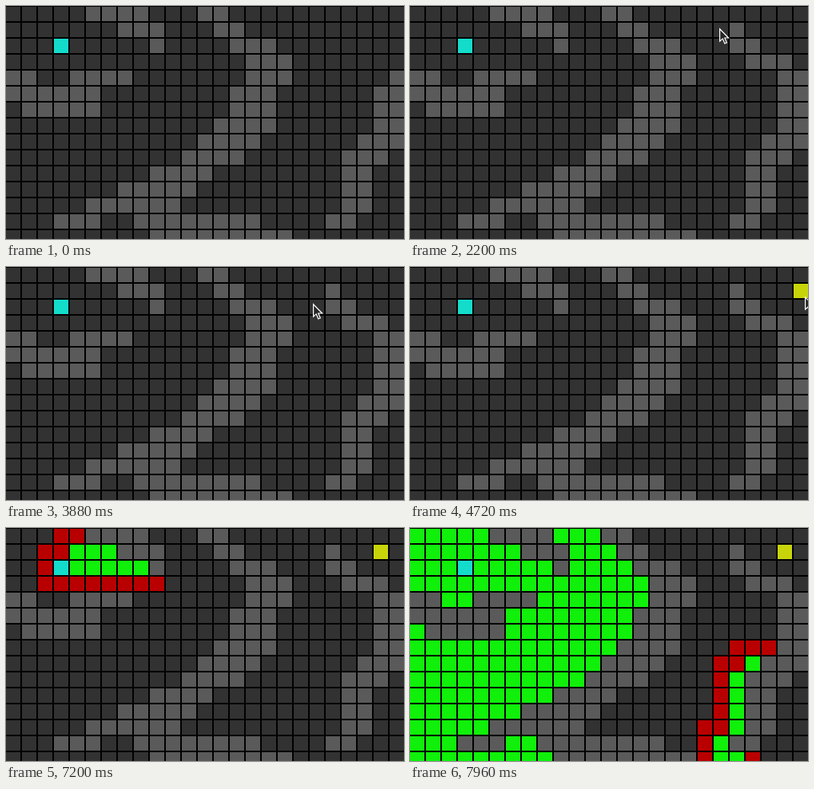
An HTML page with a canvas that plays this animation: 498x292 px, repeating every 8 s.

```html
<!DOCTYPE html>
<html lang="en">
<head>
<meta charset="utf-8">
<title>Pathfinding grid</title>
<style>
  html, body { margin: 0; height: 100%; overflow: hidden; background: #000; }
  canvas { display: block; }
</style>
</head>
<body>
<canvas id="stage" width="498" height="292"></canvas>
<script>
const ctx = document.getElementById('stage').getContext('2d');
const COLS = 25, ROWS = 17, LOOP = 8000, TICK = 40;
const START = [3, 2], END = [23, 1];
const COLOR = {
  free: '#323232', wall: '#5a5a5a', start: '#14dccb',
  end: '#c8d40a', open: '#b90000', closed: '#10f00a'
};
const id = (x, y) => y * COLS + x;

// Column ranges of the walls, row by row; the last two rows lie below the view.
const wallRows = [
  '5-8 12-13', '7-9 13-14', '9-9 14-16', '15-17', '0-1 4-7 15-17 24-24',
  '0-5 14-16 23-24', '1-5 14-16 23-24', '13-16 23-24', '12-15 22-24',
  '11-14 21-23', '9-12 21-22', '7-11 21-22', '5-10 21-22',
  '3-5 8-15 20-21', '9-17', '9-18', ''
];
// Walls painted with the pointer: column, row, time.
const painted = [
  [23, 4, 1000], [23, 3, 1400], [22, 3, 1560], [21, 3, 1720],
  [21, 2, 1800], [20, 2, 1880], [20, 1, 1960]
];
const wallTime = new Map();
wallRows.forEach((row, y) => {
  for (const range of row.split(' ').filter(Boolean)) {
    const [a, b] = range.split('-').map(Number);
    for (let x = a; x <= b; x++) wallTime.set(id(x, y), 0);
  }
});
painted.forEach(([x, y, t]) => wallTime.set(id(x, y), t));

// A* with eight neighbours of equal cost; records the step at which cells open and close.
function search(stopAt) {
  const opened = new Map([[id(...START), 1]]), closed = new Map();
  const cost = new Map([[id(...START), 0]]);
  const queue = new Set(cost.keys());
  const score = c =>
    cost.get(c) + Math.hypot(c % COLS - END[0], Math.floor(c / COLS) - END[1]);
  while (queue.size && !closed.has(stopAt)) {
    const cell = [...queue].reduce((a, b) => score(b) < score(a) ? b : a);
    const step = closed.size + 1;
    queue.delete(cell);
    closed.set(cell, step);
    const cx = cell % COLS, cy = Math.floor(cell / COLS);
    for (let y = Math.max(0, cy - 1); y <= Math.min(ROWS - 1, cy + 1); y++) {
      for (let x = Math.max(0, cx - 1); x <= Math.min(COLS - 1, cx + 1); x++) {
        const next = id(x, y), g = cost.get(cell) + 1;
        if (wallTime.has(next) || closed.has(next) || g >= (cost.get(next) ?? Infinity)) continue;
        cost.set(next, g);
        queue.add(next);
        if (!opened.has(next)) opened.set(next, step);
      }
    }
  }
  return { opened, closed };
}
const { opened, closed } = search(id(21, 8));
const midStep = closed.get(id(6, 6)) - 1, lastStep = closed.size;

function searchStep(t) {
  const k = (t - 7160) / TICK;
  if (k <= 0) return 0;
  return Math.round(k < 8 ? midStep * k / 8 : midStep + (lastStep - midStep) * (k - 8) / 12);
}

// Pointer track: time, x, y.
const track = [
  [560, 500, 105], [800, 486, 102], [1040, 477, 98], [1320, 477, 98],
  [1500, 466, 72], [1720, 436, 66], [1820, 424, 50], [1900, 410, 42],
  [1980, 402, 33], [2120, 387, 28], [2840, 387, 28], [3320, 361, 27],
  [3560, 361, 27], [3880, 384, 46], [4200, 440, 54], [4400, 458, 46],
  [4560, 478, 44], [4720, 494, 37], [4900, 495, 34], [5240, 472, 31],
  [5600, 480, 72], [5880, 487, 123], [6040, 500, 131]
];
function pointerAt(t) {
  const i = track.findIndex(p => p[0] > t);
  if (i < 1) return null;
  const [t0, x0, y0] = track[i - 1], [t1, x1, y1] = track[i];
  const u = (t - t0) / (t1 - t0);
  return [x0 + (x1 - x0) * u, y0 + (y1 - y0) * u];
}

const arrow = new Path2D('M.6 .8V16.2L4.2 12.9L6.8 19L9.3 17.9L6.8 12H11.6Z');
function drawPointer([x, y]) {
  ctx.save();
  ctx.translate(x, y);
  ctx.fillStyle = '#262626';
  ctx.strokeStyle = '#fff';
  ctx.lineWidth = 1.2;
  ctx.fill(arrow);
  ctx.stroke(arrow);
  ctx.restore();
}

function fillCell(x, y, color) {
  ctx.fillStyle = color;
  ctx.fillRect(x * 20, y * 20 + 1, 18, 18);
}

function cellColor(c, t, step) {
  if (wallTime.get(c) <= t) return COLOR.wall;
  if (closed.get(c) <= step) return COLOR.closed;
  if (opened.get(c) <= step) return COLOR.open;
  return COLOR.free;
}

function draw(t) {
  const step = searchStep(t), pointer = pointerAt(t);
  ctx.fillStyle = '#000';
  ctx.fillRect(0, 0, 498, 292);
  for (let y = 0; y < 15; y++)
    for (let x = 0; x < COLS; x++) fillCell(x, y, cellColor(id(x, y), t, step));
  fillCell(...START, COLOR.start);
  if (t >= 5240) fillCell(...END, COLOR.end);
  if (!pointer) return;
  if (t >= 4440) fillCell(Math.floor(pointer[0] / 20), Math.floor(pointer[1] / 20), COLOR.end);
  drawPointer(pointer);
}

const began = performance.now();
function frame() {
  const t = (performance.now() - began) % LOOP;
  draw(Math.floor(t / TICK) * TICK);
  requestAnimationFrame(frame);
}
frame();
</script>
</body>
</html>
```
